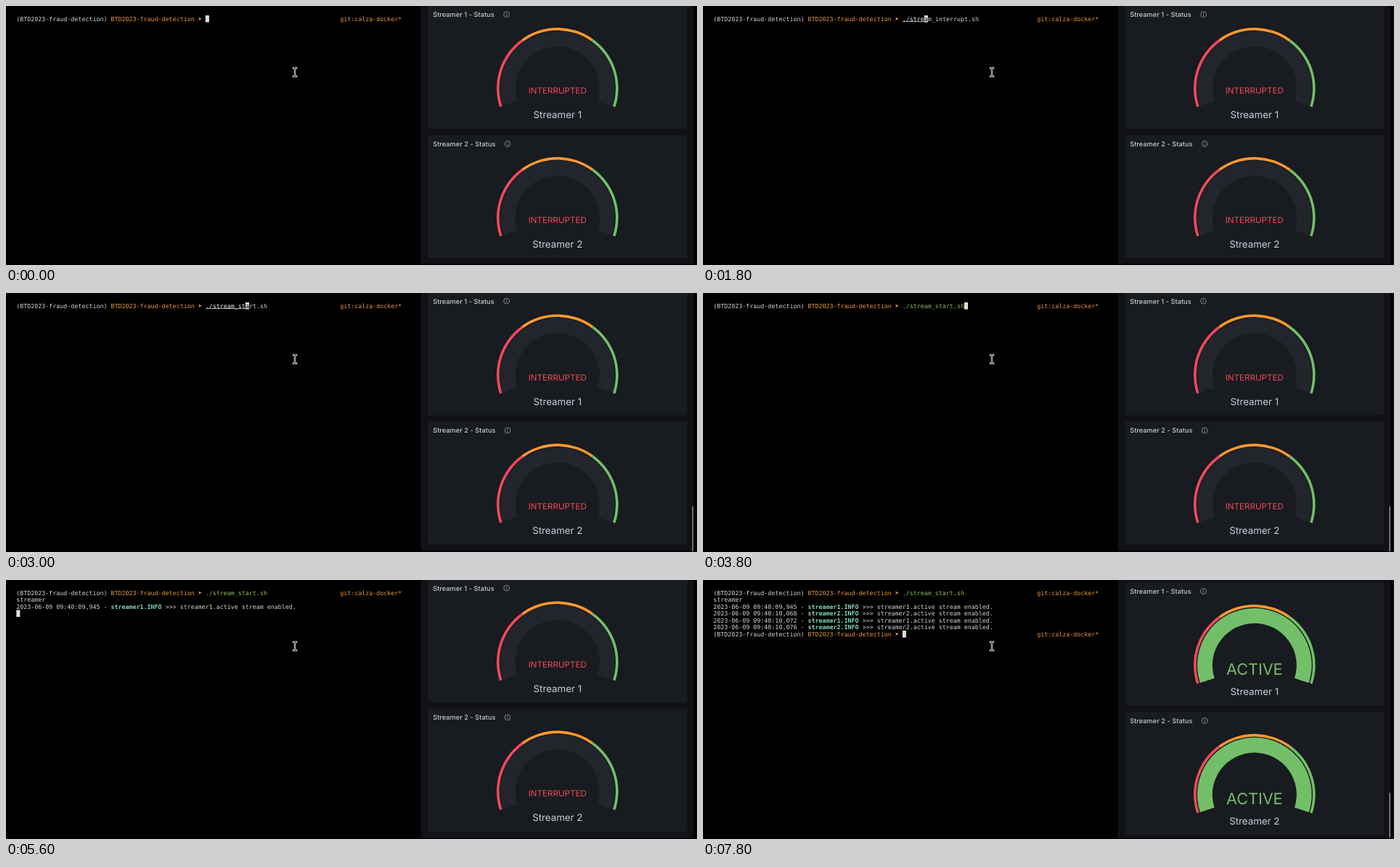
An HTML page that plays this animation: 952 by 358 pixels, repeating every 8000 ms.

```html
<!DOCTYPE html>
<html lang="en">
<head>
<meta charset="utf-8">
<title>Streamer status</title>
<style>
  html, body { margin: 0; width: 100%; height: 100%; overflow: hidden; background: #000; }
  svg { display: block; width: 952px; height: 358px; }
  text { text-rendering: geometricPrecision; white-space: pre; }
  #term text { font: 8.322px "DejaVu Sans Mono", monospace; fill: #d6d6d6; }
  #term .orange { fill: #e8983e; }
  #term .green { fill: #93bd55; }
  #term .typed { fill: #f0f0f0; }
  #term .info { fill: #83d8bb; font-weight: bold; }
  #term .under { fill: #000; }
  #panels text { font-family: Inter, sans-serif; fill: #ccccdc; }
  #panels .title { font-size: 9.1px; font-weight: 500; letter-spacing: .01em; }
  #panels .mid { text-anchor: middle; }
  #panels .label { font-size: 13.3px; }
  #panels .off { font-size: 11.6px; fill: #f2495c; }
  #panels .on { font-size: 21.6px; fill: #73bf69; }
</style>
</head>
<body>
<svg viewBox="0 0 952 358">
  <rect width="952" height="358" fill="#000"/>
  <rect x="571.5" width="375.5" height="356.5" fill="#111217"/>
  <g id="panels"></g>
  <rect x="571.5" y="356.5" width="380.5" height="1.5" fill="#050507"/>
  <rect x="947" width="5" height="358" fill="#050507"/>
  <rect id="bar" x="945.4" width="1.6" height="62" fill="#85868b"/>
  <g id="term"></g>
  <g fill="none" stroke-linecap="square">
    <path d="M396 85.7h4M398 85.7v11.6M396 97.3h4" stroke="#e4e4e4" stroke-width="2.4"/>
    <path d="M396 85.7h4M398 85.7v11.6M396 97.3h4" stroke="#222" stroke-width=".8"/>
  </g>
</svg>
<script>
const LOOP = 8000;
const CELL = 5.01, LINE = 9.5, LEFT = 14.3, TOP = 13, PROMPT = 52;
const RED = '#f2495c', ORANGE = '#ff9830', GREEN = '#73bf69';
const OLD = './stream_interrupt.sh', NEW = './stream_start.sh';
const term = document.getElementById('term');
const panels = document.getElementById('panels');
const bar = document.getElementById('bar');

// [time, typed characters]
const typing = [[0, 0], [400, 1], [600, 2], [1200, 3], [1400, 4], [1800, 6], [2000, 7],
  [2400, 8], [2600, 9], [2800, 10], [3000, 11], [3400, 12], [3800, 17]];
// [time, vertical offset of the dashboard]
const scroll = [[0, 0], [3000, -.5], [7800, 4]];
// [time, scrollbar opacity]
const fade = [[0, 0], [3000, 1], [4000, .65], [4200, .3], [4400, 0], [7800, 1]];
// [time, finished output lines]
const output = [[0, 0], [5000, 1], [5600, 2], [5800, 5]];
const stamps = ['09,945', '10,068', '10,072', '10,076'];
const marks = [...new Set([typing, scroll, fade, output, [[4400], [6000]]].flat().map(s => s[0]))];

const at = (steps, t) => steps.filter(s => s[0] <= t).pop()[1];
const colX = col => LEFT + col * CELL;
const rowY = row => TOP + row * LINE;

function put(row, col, str, cls = '') {
  return `<text x="${colX(col)}" y="${rowY(row) + 7.5}" class="${cls}">${str}</text>`;
}

function cursor(row, col, char = '') {
  return `<rect x="${colX(col)}" y="${rowY(row)}" width="${CELL}" height="${LINE}" fill="#e0e0e0"/>`
    + put(row, col, char, 'under');
}

function prompt(row) {
  return put(row, 0, '(BTD2023-fraud-detection)')
    + put(row, 26, 'BTD2023-fraud-detection', 'orange')
    + `<path transform="translate(${colX(50)} ${rowY(row) + 4.7})" d="M.2-2.3L4.8 0L.2 2.3L1.4 0z" fill="#e8983e"/>`
    + put(row, 89, 'git:calza-docker*', 'orange');
}

function command(t) {
  const n = at(typing, t);
  if (n === 0) return cursor(0, PROMPT);
  if (n === NEW.length) {
    return put(0, PROMPT, NEW, 'green') + (t < 4400 ? cursor(0, PROMPT + n) : '');
  }
  const text = n < 10 ? OLD : NEW;
  const line = n > 1
    ? `<rect x="${colX(PROMPT)}" y="${rowY(0) + 8.3}" width="${n * CELL}" height=".7" fill="${n > 2 ? '#f0f0f0' : '#93bd55'}"/>`
    : '';
  return put(0, PROMPT, text.slice(0, n), n > 2 ? 'typed' : 'green') + line
    + put(0, PROMPT + n + 1, text.slice(n + 1)) + cursor(0, PROMPT + n, text[n]);
}

function log(i) {
  const name = 'streamer' + (i % 2 + 1), row = i + 2;
  return put(row, 0, `2023-06-09 09:40:${stamps[i]} -`)
    + put(row, 26, name + '.INFO', 'info')
    + put(row, 41, `&gt;&gt;&gt; ${name}.active stream enabled.`);
}

function drawTerm(t) {
  const lines = at(output, t);
  let out = prompt(0) + command(t);
  if (lines > 0) out += put(1, 0, 'streamer');
  for (let i = 0; i < lines - 1; i++) out += log(i);
  if (t >= 6000) out += prompt(6) + cursor(6, PROMPT);
  else if (t >= 4400) out += cursor(lines + 1, 0);
  term.innerHTML = out;
}

// ring segment; angles in degrees, clockwise from the right
function band(r1, r2, from, to, color) {
  const p = (r, deg) => {
    const a = deg * Math.PI / 180;
    return `${(759.8 + r * Math.cos(a)).toFixed(2)} ${(113.8 + r * Math.sin(a)).toFixed(2)}`;
  };
  const big = to - from > 180 ? 1 : 0;
  return `<path d="M${p(r2, from)}A${r2} ${r2} 0 ${big} 1 ${p(r2, to)}L${p(r1, to)}`
    + `A${r1} ${r1} 0 ${big} 0 ${p(r1, from)}z" fill="${color}"/>`;
}

function panel(n, y, active) {
  const name = 'Streamer ' + n, ix = n === 1 ? 689.6 : 691;
  return `<g transform="translate(0 ${y})">
    <rect x="582.4" y=".6" width="355.4" height="168" rx="1" fill="#181b1f" stroke="#24262b" stroke-width=".7"/>
    <text x="588.2" y="15.2" class="title">${name} - Status</text>
    <circle cx="${ix}" cy="11.7" r="3.9" fill="none" stroke="#a0a1ad" stroke-width=".8"/>
    <path d="M${ix} 11.2v2.5M${ix} 9.4v.9" stroke="#a0a1ad" stroke-width=".9"/>
    ${band(58, 78.8, 162, 378, active ? GREEN : '#22252b')}
    ${band(80.2, 83.8, 162, 234, RED)}
    ${band(80.2, 83.8, 234, 306, ORANGE)}
    ${band(80.2, 83.8, 306, 378, GREEN)}
    ${active ? '<text x="759.8" y="127.4" class="mid on">ACTIVE</text>'
      : '<text x="759.8" y="121.2" class="mid off">INTERRUPTED</text>'}
    <text x="759.8" y="155" class="mid label">${name}</text>
  </g>`;
}

function drawPanels(t) {
  const y = at(scroll, t), active = t >= 7800;
  panels.innerHTML = panel(1, y, active) + panel(2, y + 178.8, active);
  bar.setAttribute('y', active ? 294 : 295);
  bar.setAttribute('opacity', at(fade, t));
}

let shown = -1;
function frame() {
  const t = performance.now() % LOOP;
  const step = Math.max(...marks.filter(m => m <= t));
  if (step !== shown) {
    shown = step;
    drawTerm(step);
    drawPanels(step);
  }
  requestAnimationFrame(frame);
}
frame();
</script>
</body>
</html>
```
